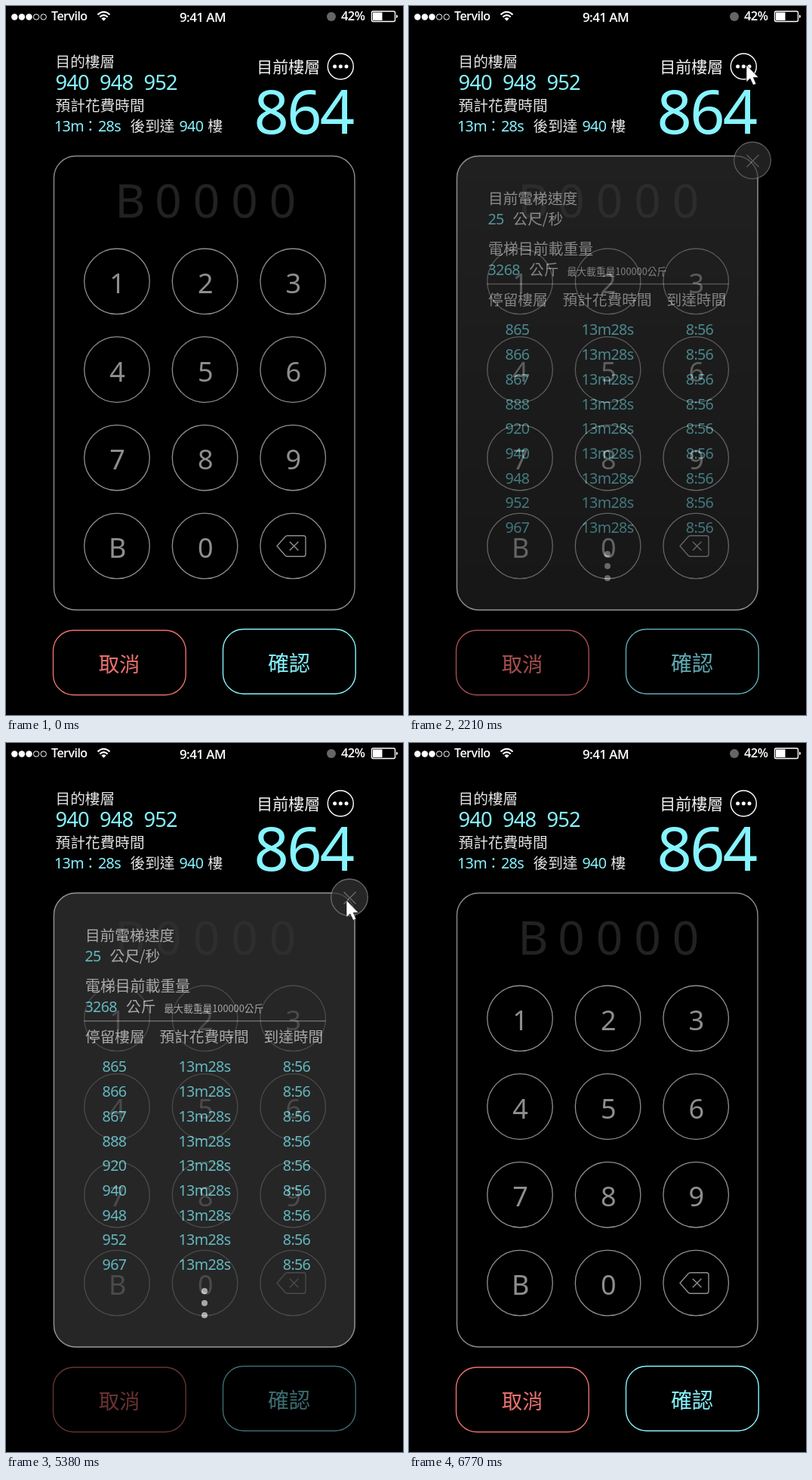
Recreate the animation shown at these times as an HTML page. Size 526 px wide and 938 px high, loop 7.55 s.

```html
<!DOCTYPE html>
<html lang="zh-Hant">
<head>
<meta charset="utf-8">
<title>電梯面板</title>
<style>
  html, body { margin: 0; width: 100%; height: 100%; overflow: hidden; background: #000; }
  svg { position: absolute; left: 0; top: 0; width: 526px; height: 938px; fill: none; }
  text { font-family: "Noto Sans CJK TC", "Noto Sans TC", "Noto Sans CJK", sans-serif; white-space: pre; }
  .latin { font-family: "Noto Sans", "Open Sans", sans-serif; letter-spacing: -.033em; }
  .status { font-family: "Open Sans", "Noto Sans", sans-serif; font-weight: 600; }
</style>
</head>
<body>
<svg id="base" viewBox="0 0 526 938"></svg>
<svg id="sheet" viewBox="0 0 526 938"></svg>
<svg id="pointer" viewBox="0 0 526 938">
  <path id="arrow" fill="#fff" stroke="#111" stroke-width=".6"
    d="M0 0V22.5L5 18L9 26.5L12.8 25L9.2 16.5H16Z"/>
  <g id="hand" stroke="#222">
    <path fill="#fff" d="M0 1.5a2 2 0 0 1 4 0V9a2 2 0 0 1 4 .5a2 2 0 0 1 4 1a2 2 0 0 1 4 1V16q0 3-2 5V23.5H3V21L-5.5 13a2 2 0 0 1 3-2.5L0 13Z"/>
    <path d="M4 8v5M8 9.5v4M12 10.5v3"/>
  </g>
</svg>
<script>
const CYAN = '#86f4ff', RED = '#ec716e', GREY = '#8e8e8e', PALE = '#e2e2e2';
const LOOP = 7550, SIZE = 19.7;
const $ = id => document.getElementById(id);

const text = (s, x, y, size, fill, cls = '', anchor = 'start') =>
  `<text x="${x}" y="${y}" font-size="${size}" fill="${fill}" class="${cls}" text-anchor="${anchor}">${s}</text>`;
const han = (s, x, y, size = SIZE, fill = PALE) => text(s, x, y, size, fill);
const latin = (s, x, y, size = SIZE, fill = CYAN) => text(s, x, y, size, fill, 'latin');
const mid = (s, x, y, size, fill) => text(s, x, y, size, fill, 'latin', 'middle');
const circle = (x, y, r, fill, stroke = 'none', width = 1.3) =>
  `<circle cx="${x}" cy="${y}" r="${r}" fill="${fill}" stroke="${stroke}" stroke-width="${width}"/>`;
const line = (d, stroke, width = 1.4) => `<path d="${d}" stroke="${stroke}" stroke-width="${width}"/>`;
const box = (x, y, w, h, r, stroke, fill = 'none') =>
  `<rect x="${x}" y="${y}" width="${w}" height="${h}" rx="${r}" stroke="${stroke}" fill="${fill}" stroke-width="1.4"/>`;
const panel = fill => box(63.5, 198.5, 398.5, 600.5, 29, GREY, fill);

function statusBar() {
  const signal = [0, 1, 2, 3, 4].map(i =>
    circle(11.3 + i * 9.6, 14.5, i < 3 ? 4.2 : 3.7, i < 3 ? '#fff' : 'none', i < 3 ? 'none' : '#fff', 1)).join('');
  return signal
    + text('Tervilo', 60, 19, 16, '#fff', 'latin status')
    + line('M121.5 11.5Q129.5 4 137.5 11.5M124.3 14.5Q129.5 9.6 134.7 14.5', '#fff', 2.1)
    + '<path d="M126.4 16.6Q129.5 14 132.6 16.6L129.5 19.8Z" fill="#fff"/>'
    + text('9:41 AM', 260.5, 21, 17, '#fff', 'latin status', 'middle')
    + circle(431, 14, 6, '#666')
    + text('42%', 444, 19, 16.5, '#fff', 'latin status')
    + box(484.5, 7, 31, 13.5, 2, '#fff')
    + '<path d="M486 8.5h12.5v10.5H486zM517 11.5q2 .5 2 2.3t-2 2.3z" fill="#fff"/>';
}

function header() {
  return han('目的樓層', 65.5, 80.5)
    + [940, 948, 952].map((n, i) => latin(n, 65.5 + i * 58.5, 111, 27.3)).join('')
    + han('預計花費時間', 65.5, 138.5)
    + latin('13m', 64, 166) + han('：', 102, 166, SIZE, CYAN) + latin('28s', 122, 166)
    + han('後到達', 164.5, 166) + latin('940', 229.5, 166) + han('樓', 267.5, 166)
    + han('目前樓層', 332.3, 88, 21, '#f2f2f2')
    + circle(443.3, 80, 17, 'none', '#fff', 1.4)
    + [435.6, 443.3, 451].map(x => circle(x, 80, 2.5, '#fff')).join('')
    + latin('864', 328.5, 169, 81);
}

function keypad() {
  const slots = ['B', 0, 0, 0, 0].map((c, i) => mid(c, 163.5 + i * 50.5, 280, 62, '#222')).join('');
  const keys = [...'123456789B0', ''].map((c, i) => {
    const x = 147 + i % 3 * 116.6, y = 364.3 + Math.floor(i / 3) * 116.7;
    return circle(x, y, 43.3, 'none', GREY) + mid(c, x, y + 15.7, 36, GREY);
  }).join('');
  return panel('none') + slots + keys
    + line('M359 714.5L370 702Q371.2 700.7 373 700.7H394Q397 700.7 397 703.7V725.3Q397 728.3 394 728.3H373Q371.2 728.3 370 727Z'
      + 'M375.8 708.7L387.4 720.3M387.4 708.7L375.8 720.3', GREY);
}

const buttons = () => '<g id="buttons">'
  + box(62.5, 826, 175.7, 85.5, 27, RED) + text('取消', 150, 881, 27.3, RED, '', 'middle')
  + box(287.5, 824.5, 175.7, 85.5, 27, CYAN) + text('確認', 375, 879.5, 28, CYAN, '', 'middle') + '</g>';

function infoSheet() {
  const rows = [865, 866, 867, 888, 920, 940, 948, 952, 967].map((floor, i) =>
    [[floor, 143.5], ['13m28s', 263], ['8:56', 385]]
      .map(([s, x]) => mid(s, x, Math.round(435.45 + i * 32.7), SIZE, CYAN)).join('')).join('');
  return panel('#333')
    + circle(455, 204.3, 24.3, '#333', GREY)
    + line('M447.5 197L463.5 213M463.5 197L447.5 213', GREY)
    + han('目前電梯速度', 105, 262) + latin('25', 104.5, 289) + han('公尺/秒', 137.5, 289)
    + han('電梯目前載重量', 105, 329, 19.9) + latin('3268', 104.5, 356) + han('公斤', 159, 356)
    + han('最大載重量100000公斤', 209.5, 356, 12.75)
    + line('M103.5 367.8H423.5', GREY)
    + han('停留樓層', 105, 396) + han('預計花費時間', 203.5, 396) + han('到達時間', 341.5, 396)
    + rows
    + [725, 741, 757].map(y => circle(263, y, 4, PALE)).join('');
}

// Progress 0..1 in n discrete steps; the first step shows at start, the last at end.
const steps = (t, start, end, n) => t < start ? 0
  : Math.min(n, Math.floor((t - start) / (end - start) * (n - 1) + 1.001)) / n;
const dissolve = u => u >= 1 ? 1 : 1 - Math.exp(-14 * u ** 2.4);
const easeOut = u => 1 - (1 - u) ** 2;
const easeInOut = u => u * u * (3 - 2 * u);
const between = (a, b, u) => a.map((v, i) => v + (b[i] - v) * u);

const MORE = [447, 78], CLOSE = [451, 208];

function pointerAt(t) {
  if (t < 420) return null;
  if (t < 1180) return between([535, 1023], [457, 143], easeOut(steps(t, 420, 1110, 10)));
  if (t < 3510) return between([457, 143], MORE, easeOut(steps(t, 1180, 1340, 3)));
  if (t < 6080) return between(MORE, CLOSE, easeInOut(steps(t, 3510, 3970, 7)));
  if (t < 6230) return between(CLOSE, [545, 338], steps(t, 6080, 6230, 3));
  if (t >= 6550 && t < 6770) return between([522, 805], [522, 930], steps(t, 6550, 6770, 4));
  return null;
}

function draw(t) {
  const opening = t < 5380;
  const shown = opening ? dissolve(steps(t, 2120, 2500, 6)) : 1 - dissolve(steps(t, 5380, 5680, 5));
  const low = opening ? shown ** 2 : shown; // the sheet appears from the top down
  $('sheet').style.maskImage = $('sheet').style.webkitMaskImage =
    `linear-gradient(rgba(0,0,0,${shown}) 20%, rgba(0,0,0,${low}))`;
  $('buttons').setAttribute('opacity', 1 - .74 * low);

  const p = pointerAt(t);
  $('pointer').style.display = p ? '' : 'none';
  if (!p) return;
  const hover = (t >= 1260 && t < 2120) || (t >= 3510 && t < 5380 && p[1] > 180);
  $('arrow').style.display = hover ? 'none' : '';
  $('hand').style.display = hover ? '' : 'none';
  for (const id of ['arrow', 'hand']) $(id).setAttribute('transform', `translate(${p})`);
}

$('base').innerHTML = statusBar() + header() + keypad() + buttons();
$('sheet').innerHTML = infoSheet();

const began = performance.now();
function frame() {
  draw((performance.now() - began) % LOOP);
  requestAnimationFrame(frame);
}
frame();
</script>
</body>
</html>
```
